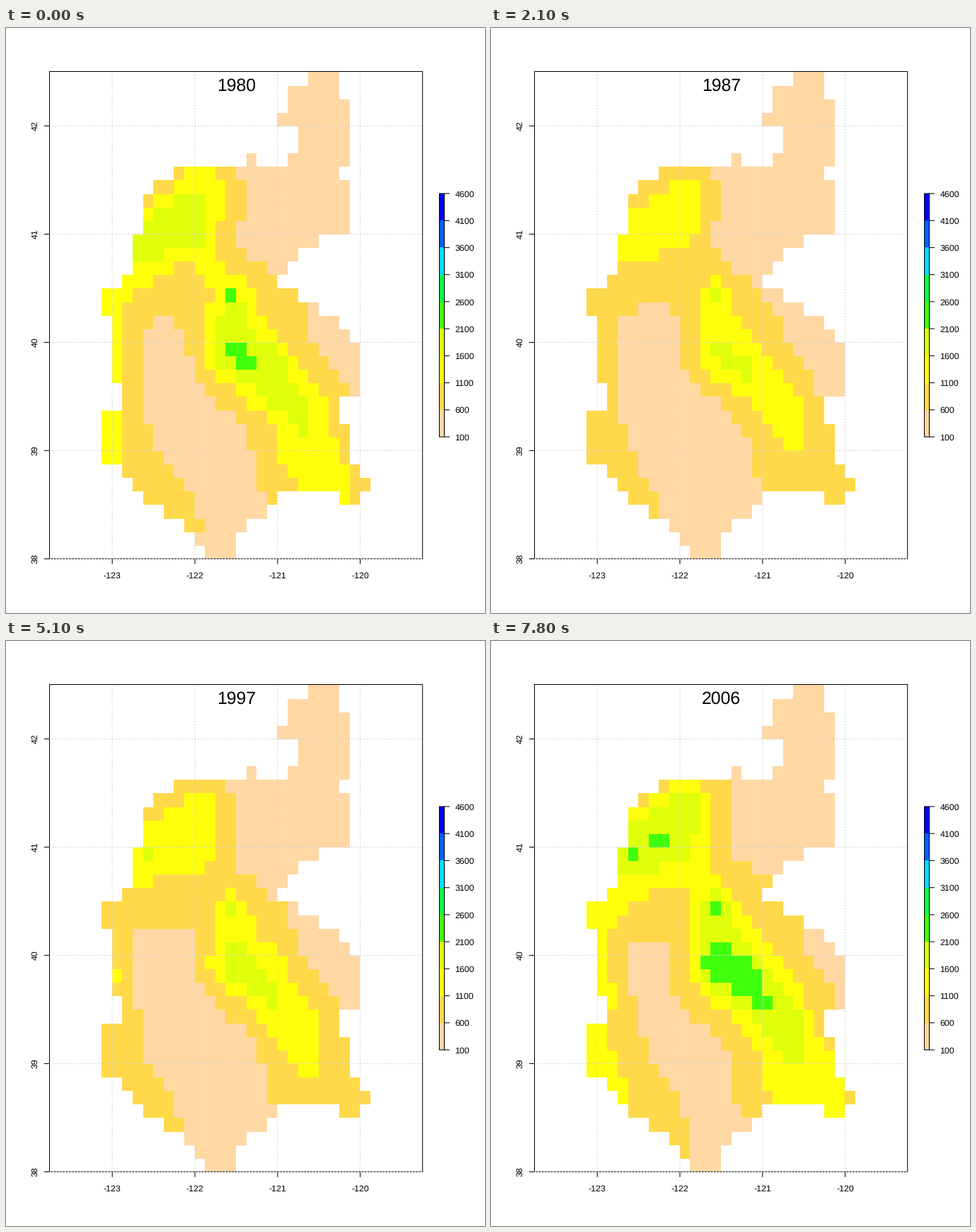
Recreate the animation shown at these times as a matplotlib script. Size 677 by 827 pixels, loop 8 s.

```python
import numpy as np
import matplotlib.pyplot as plt
from matplotlib.animation import FuncAnimation
from matplotlib.colors import ListedColormap
from matplotlib.path import Path

plt.rcParams["text.hinting"] = "none"

W, H, DPI = 677, 827, 64
PX = 72 / DPI                      # points per pixel
LINE = 1.04 * PX
ROWS, COLS = 36, 26                # cells of 1/8 degree
PALETTE = ["#FFD8A4", "#FFD94A", "#FFFF0B", "#DFFF0B", "#40FF0D",
           "#0AFF42", "#00DCFF", "#0060FF", "#0000FF"]
LOWEST, CLASS_WIDTH = 100, 500
FIRST_YEAR, STEPS_PER_YEAR = 1980, 3

# Rainfall of each year relative to the typical year
WETNESS = [1.2, 1.2, 1.45, 1.9, .85, .8, 1.2, .93, .85, .87, .68, .82, .95, 1.27,
           .87, 1.6, 1.5, 1, 1.85, .97, 1.22, 1.08, 1.05, 1.2, 1.08, 1.3, 1.35]


def lon_x(lon):
    return 150.2 + 116.8 * (lon + 123)


def lat_y(lat):
    return 750.4 - 153 * (lat - 38)


# ---- terrain, in cell units from the north-west corner
col, row = np.meshgrid(np.arange(COLS) + 0.5, np.arange(ROWS) + 0.5)

east_rim = [(20, 0), (23, 0), (23, 2), (24, 2), (24, 6.5), (23, 7.5), (24, 8.5),
            (24, 12), (20.6, 12.5), (16.9, 15.5), (23, 18.5), (25, 20.5), (25, 24),
            (23, 24), (23, 25.5), (24, 26.5), (24, 28.5), (26, 30.5), (25, 31.5),
            (25, 32), (23, 32), (23, 31.1), (17.2, 31.1), (14.3, 33.5), (13, 34.5),
            (13, 36)]
west_rim = [(10, 36), (10, 35.5), (8, 33.5), (4, 31.5), (2, 29.5), (0, 28.6), (0, 25),
            (2, 24.6), (2, 23), (1, 22.8), (1, 18.1), (0, 17.9), (0, 16), (2, 15.6),
            (4.1, 11), (4, 9.3), (7, 7.2), (7, 7), (14, 7), (14, 6), (15, 6), (15, 7),
            (18, 7), (19, 6), (19, 4), (17, 4), (17, 3), (18, 3), (18, 1), (20, 1)]
basin = Path(east_rim + west_rim).contains_points(
    np.column_stack([col.ravel(), row.ravel()])).reshape(ROWS, COLS)


def ridge(*knots):
    """Rain along a crest line through knots of (col, row, height, width)."""
    t = np.linspace(0, len(knots) - 1, 120)
    x, y, height, width = (np.interp(t, range(len(knots)), k)[:, None, None]
                           for k in zip(*knots))
    bumps = height * np.exp(-((col - x) ** 2 + (row - y) ** 2) / width ** 2)
    return bumps.max(axis=0)


lowland = 380
north_range = ridge((4.5, 12.5, 1220, 2.8), (9.5, 9.5, 1050, 2.8))
main_range = ridge((9.5, 13, 550, 2), (11, 14.5, 550, 2), (12.5, 16.5, 650, 2.4),
                   (12.5, 20.5, 1330, 2.6), (16, 22.5, 1250, 2.7), (19, 25, 1100, 3),
                   (20, 28, 780, 4), (23.5, 31, 560, 4))
peak = ridge((12.5, 16.5, 600, 0.9))
plateau = ridge((16, 18.5, 350, 3.5))
valley_head = ridge((1, 16.5, 250, 1.8), (9, 17, 250, 1.8))
coast_range = ridge((1, 15, 250, 2), (0.8, 20, 780, 2), (1, 22, 780, 2),
                    (0.3, 27, 600, 3.4), (3, 30.5, 500, 3), (7.5, 33.5, 250, 2.4))
typical_rain = (lowland + north_range + main_range + peak + plateau
                + valley_head + coast_range)


def rain_classes(year):
    rain = typical_rain * WETNESS[year - FIRST_YEAR]
    classes = np.clip((rain - LOWEST) // CLASS_WIDTH, 0, len(PALETTE) - 1)
    return np.ma.array(classes, mask=~basin)


# ---- stage
fig = plt.figure(figsize=(W / DPI, H / DPI), dpi=DPI, facecolor="white")
ax = fig.add_axes([0, 0, 1, 1])
ax.axis("off")


def line(x, y, color="black", **style):
    ax.plot(x, y, color=color, lw=LINE, snap=False, solid_capstyle="butt",
            dash_capstyle="butt", **style)


def label(x, y, text, size=12.4, **style):
    return ax.text(x, y, text, fontsize=size * PX, family="Liberation Sans",
                   va="baseline", **style)


def frame(x0, y0, x1, y1):
    ax.add_patch(plt.Rectangle((x0, y0), x1 - x0, y1 - y0, fill=False, ec="black",
                               lw=LINE, joinstyle="round", snap=False, zorder=2))


cells = ax.pcolormesh(np.floor(lon_x(-123.125 + np.arange(COLS + 1) / 8)),
                      np.ceil(lat_y(42.5 - np.arange(ROWS + 1) / 8)),
                      rain_classes(FIRST_YEAR), cmap=ListedColormap(PALETTE),
                      vmin=-0.5, vmax=len(PALETTE) - 0.5, antialiased=False, zorder=1)
ax.set(xlim=(0, W), ylim=(H, 0))

LEFT, TOP, RIGHT, BOTTOM = 61.5, 61.5, 588.7, 750.4
frame(LEFT, TOP, RIGHT, BOTTOM)
dots = dict(color="#D3D3D3", linestyle=(0, (2, 2.1)), zorder=3)
for lon in range(-123, -119):
    x = lon_x(lon)
    line([x, x], [BOTTOM, TOP], **dots)
    line([x, x], [BOTTOM, BOTTOM + 7.5])
    label(x, 777.5, str(lon), ha="center")
for lat in range(38, 43):
    y = lat_y(lat)
    line([LEFT, RIGHT], [y, y], **dots)
    line([LEFT - 7.5, LEFT], [y, y])
    label(44.5, y, str(lat), ha="center", rotation=90, rotation_mode="anchor")

# ---- colour key
KEY_LEFT, KEY_RIGHT, KEY_TOP, KEY_BOTTOM = 612.5, 619.5, 234, 578
step = (KEY_BOTTOM - KEY_TOP) / len(PALETTE)
for i, color in enumerate(PALETTE):
    ax.add_patch(plt.Rectangle((KEY_LEFT, KEY_BOTTOM - (i + 1) * step),
                               KEY_RIGHT - KEY_LEFT, step, fc=color, lw=0,
                               antialiased=False))
frame(KEY_LEFT, KEY_TOP, KEY_RIGHT, KEY_BOTTOM)
for i in range(len(PALETTE) + 1):
    y = KEY_BOTTOM - i * step
    line([KEY_RIGHT, KEY_RIGHT + 7.5], [y, y])
    label(634.3, y + 4.5, str(LOWEST + CLASS_WIDTH * i), ha="left")

title = label(325.3, 89, str(FIRST_YEAR), size=24.8, ha="center")


def update(i):
    year = FIRST_YEAR + i // STEPS_PER_YEAR
    cells.set_array(rain_classes(year))
    title.set_text(str(year))
    return cells, title


anim = FuncAnimation(fig, update, frames=80, interval=100, repeat=True, repeat_delay=0)
plt.show()
```
